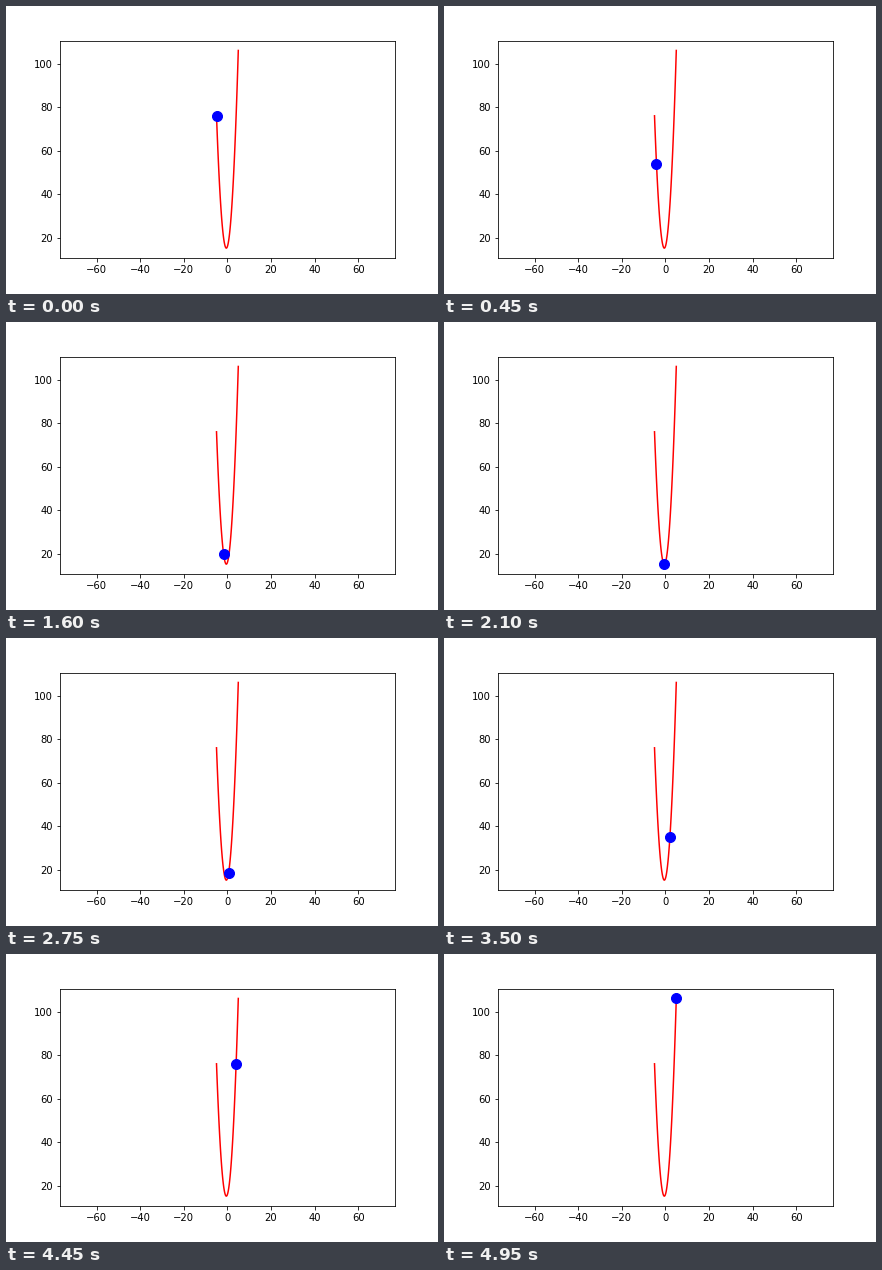
Recreate the animation shown at these times as a matplotlib script. Size 432 by 288 pixels, loop 5 s.

```python
import matplotlib.pyplot as plt
import numpy as np
from matplotlib.animation import FuncAnimation

FRAMES = 100
INTERVAL = 50


def parabola(x):
    return 3 * x**2 + 3 * x + 16


xs = np.linspace(-5, 5, FRAMES)
ys = parabola(xs)

fig, ax = plt.subplots(figsize=(6, 4), dpi=72)
fig.subplots_adjust(left=0.125, right=0.9, bottom=0.125, top=0.88)

ax.plot(xs, ys, "r-", lw=1.5)
ball, = ax.plot(xs[:1], ys[:1], "bo", ms=10)
ax.set_aspect("equal", adjustable="datalim")


def update(i):
    ball.set_data([xs[i]], [ys[i]])
    return ball,


anim = FuncAnimation(fig, update, frames=FRAMES, interval=INTERVAL,
                     repeat=True, repeat_delay=0)
plt.show()
```
